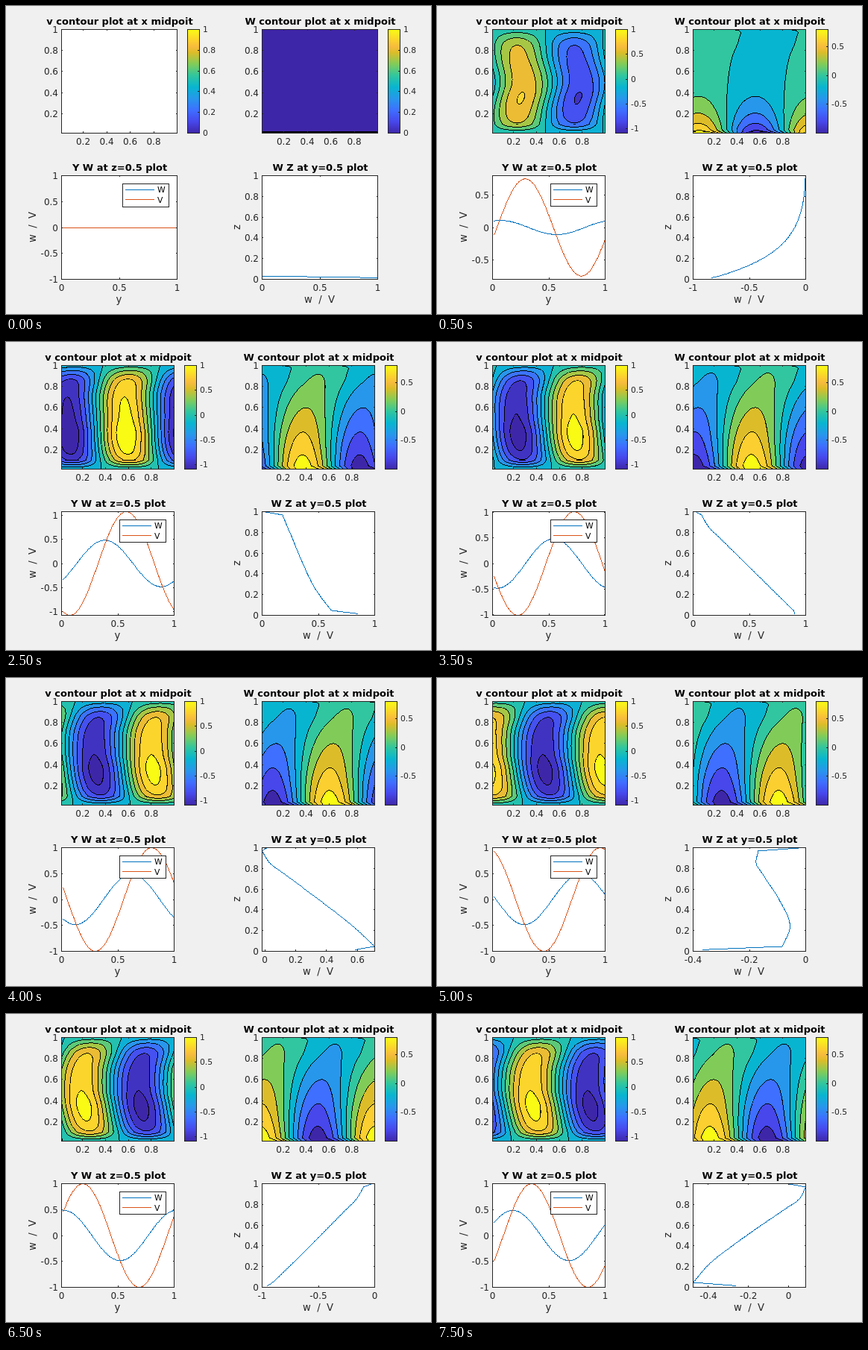
An HTML page with a canvas for the animation above (8 s loop, 570 by 413 pixels).

```html
<!DOCTYPE html>
<html lang="en">
<head>
<meta charset="utf-8">
<title>Wave plots</title>
<style>
html, body { margin: 0; width: 570px; height: 413px; overflow: hidden; background: #f0f0f0; }
canvas { display: block; }
</style>
</head>
<body>
<canvas id="stage" width="570" height="413"></canvas>
<script>
const ctx = document.getElementById('stage').getContext('2d');
const FONT = '"DejaVu Sans", Verdana, sans-serif';
const INK = '#262626', BLUE = '#0072bd', RED = '#d95319';
const N = 64, STEPS = 16, HOLD = 500;
const TOP = 31, LOW = 227, H = 139, LEFT = 74, RIGHT = 343;

// Colour stops: position (0 to 9), r, g, b
const STOPS = [
  [0, 62, 38, 168], [1, 71, 71, 235], [2, 62, 111, 255], [3, 39, 151, 235],
  [4, 8, 181, 208], [5, 49, 198, 159], [6, 129, 204, 89], [7, 220, 189, 41],
  [7.5, 247, 187, 61], [8, 252, 207, 48], [9, 249, 251, 21]
];
// Vertical profile of W: z, cosine part, sine part
const W_PROFILE = [
  [1 / 64, .996, -.087], [3 / 64, .888, .18], [.25, .695, .15], [.5, .483, .045],
  [.75, .278, -.08], [.85, .195, -.128], [62 / 64, .13, -.139], [1, .02, 0]
];
// Vertical profile of V: z, amplitude, shift along y
const V_PROFILE = [
  [1 / 64, .01, .09], [.1, .77, .08], [.18, .97, .06], [.35, 1.085, .025], [.5, 1, 0],
  [.7, .93, .012], [.85, .8, .058], [.93, .5, .085], [1, .1, .11]
];
const V_GAIN = [0, .75, .97, 1.05, 1.075, 1.075, 1.04, 1.015];

const vGain = k => k < V_GAIN.length ? V_GAIN[k] : .998;
const clamp = (v, a, b) => Math.min(b, Math.max(a, v));

function color(t) {
  const p = clamp(t, 0, 1) * 9;
  let i = 0;
  while (i < STOPS.length - 2 && p > STOPS[i + 1][0]) i++;
  const a = STOPS[i], b = STOPS[i + 1], u = (p - a[0]) / (b[0] - a[0]);
  return [1, 2, 3].map(c => Math.round(a[c] + (b[c] - a[c]) * u));
}

// Linear in the end cells, smooth cubic between
function profile(nodes, z) {
  const last = nodes.length - 2;
  let i = 0;
  while (i < last && z > nodes[i + 1][0]) i++;
  const a = nodes[i], b = nodes[i + 1], h = b[0] - a[0], u = (z - a[0]) / h;
  if (i === 0 || i === last) return [1, 2].map(c => a[c] + (b[c] - a[c]) * u);
  const p = i > 1 ? nodes[i - 1] : a, q = i < last - 1 ? nodes[i + 2] : b;
  return [1, 2].map(c => {
    const m0 = (b[c] - p[c]) / (b[0] - p[0]) * h, m1 = (q[c] - a[c]) / (q[0] - a[0]) * h;
    const u2 = u * u, u3 = u2 * u;
    return (2 * u3 - 3 * u2 + 1) * a[c] + (u3 - 2 * u2 + u) * m0 +
      (3 * u2 - 2 * u3) * b[c] + (u3 - u2) * m1;
  });
}

// Each returns a function of y at height z and step k
function wRow(z, k) {
  if (!k) return () => z < 1.5 / N ? 1 : 0;
  let [re, im] = profile(W_PROFILE, z);
  if (z > 1.5 / N) {
    const fade = Math.exp(-3 * z / k ** 4);
    re *= fade;
    im *= fade * (1 - .2 * Math.exp((3 - k) / 3) * (1 - .3 * z));
  }
  return y => {
    const a = 2 * Math.PI * y - k / 2;
    return re * Math.cos(a) - im * Math.sin(a);
  };
}

function vRow(z, k) {
  const [amp, shift] = profile(V_PROFILE, z);
  const bend = shift * (1 - Math.exp((1 - k) / 3));
  const early = .041 * Math.exp((3 - k) / 5) * Math.exp(-(((z - .5) / .2) ** 2));
  const peak = .149 + bend + early + k / (4 * Math.PI);
  return y => vGain(k) * amp * Math.cos(2 * Math.PI * (y - peak));
}

function label(s, x, y, size = 12, align = 'center', fill = INK, bold = '') {
  ctx.font = `${bold} ${size}px ${FONT}`;
  ctx.textAlign = align;
  ctx.fillStyle = fill;
  ctx.fillText(s, x, y);
}

const title = (s, x, y) => label(s, x + 1, y, 13, 'center', '#000', 'bold');

function sideLabel(s, x, y) {
  ctx.save();
  ctx.translate(x, y);
  ctx.rotate(-Math.PI / 2);
  label(s, 0, 0, 13.2);
  ctx.restore();
}

function box(x, y, w, h) {
  ctx.strokeStyle = INK;
  ctx.lineWidth = 1;
  ctx.strokeRect(x + .5, y + .5, w, h);
}

function dot(x, y, w, h, fill) {
  ctx.fillStyle = fill;
  ctx.fillRect(x, y, w, h);
}

// Hard-edged one-pixel polyline
function line(points, fill) {
  ctx.fillStyle = fill;
  for (let i = 1; i < points.length; i++) {
    const [x0, y0] = points[i - 1], [x1, y1] = points[i];
    const n = Math.max(1, Math.ceil(Math.max(Math.abs(x1 - x0), Math.abs(y1 - y0))));
    for (let j = 0; j <= n; j++) {
      ctx.fillRect(Math.round(x0 + (x1 - x0) * j / n), Math.round(y0 + (y1 - y0) * j / n), 1, 1);
    }
  }
}

function range(lo, hi, step) {
  const out = [];
  for (let i = Math.ceil(lo / step - 1e-6); i * step <= hi + 1e-6; i++) out.push(+(i * step).toFixed(1) || 0);
  return out;
}

function xTicks(values, at, top, bottom) {
  for (const v of values) {
    const x = at(v);
    label(String(v), x + .5, bottom + 16);
    dot(Math.round(x), bottom - 2, 1, 2, INK);
    dot(Math.round(x), top, 1, 2, INK);
  }
}

function yTicks(values, at, left, width) {
  for (const v of values) {
    const y = at(v);
    label(String(v), left - 4, y + 5, 12, 'right');
    dot(left, Math.round(y), 2, 1, INK);
    dot(left + width - 1, Math.round(y), 2, 1, INK);
  }
}

function contour(row, k, left, w, lo, hi) {
  const img = ctx.createImageData(w + 1, H + 1), span = 1 - 1 / N;
  const rows = [];
  for (let j = 0; j <= H + 1; j++) {
    const f = row(Math.max(1 / N, 1 - span * j / H), k), r = [];
    for (let i = 0; i <= w + 1; i++) r.push(f(1 / N + span * i / w) * 5);
    rows.push(r);
  }
  const top = Math.round(hi * 5);
  for (let j = 0; j <= H; j++) for (let i = 0; i <= w; i++) {
    const f = rows[j][i], near = Math.round(f);
    const slope = Math.max(Math.abs(rows[j][i + 1] - f), Math.abs(rows[j + 1][i] - f));
    const edge = Math.abs(near) <= top && Math.abs(f - near) < slope / 2;
    const band = Math.floor(f) < -top ? lo : Math.min(hi, Math.floor(f) / 5);
    const c = edge ? [0, 0, 0] : color((band - lo) / (hi - lo));
    img.data.set([...c, 255], (j * (w + 1) + i) * 4);
  }
  ctx.putImageData(img, left, TOP);
}

function colorbar(x, lo, hi, step) {
  for (let j = 0; j <= H; j++) dot(x, TOP + j, 17, 1, `rgb(${color(1 - j / H)})`);
  box(x, TOP, 16, H);
  for (const v of range(lo, hi, step)) {
    const y = TOP + (hi - v) / (hi - lo) * H;
    label(String(v), x + 21, y + 4, 10.8, 'left');
    dot(x + 14, Math.round(y), 2, 1, INK);
  }
}

function contourPanel(k, left, w, name, row, lo, hi) {
  const span = 1 - 1 / N;
  dot(left, TOP, w, H, '#fff');
  if (k) contour(row, k, left, w, lo, hi);
  else if (row === wRow) {
    dot(left, TOP, w, H, `rgb(${color(0)})`);
    dot(left, TOP + H - 2, w, 3, '#000');
  }
  box(left, TOP, w, H);
  xTicks([.2, .4, .6, .8], v => left + (v - 1 / N) / span * w, TOP, TOP + H);
  yTicks([.2, .4, .6, .8, 1], v => TOP + (1 - v) / span * H, left, w);
  title(name, left + w / 2, 25);
  if (k) colorbar(left + w + 14, lo, hi, .5);
  else colorbar(left + w + 14, 0, 1, .2);
}

function sectionPanel(k, w) {
  const gain = vGain(k);
  const lim = !k ? 1 : gain > 1 ? gain : Math.ceil(gain * 5) / 5;
  const xAt = v => LEFT + v * w, yAt = v => LOW + (1 - v / lim) * H / 2;
  const curve = f => Array.from({ length: N }, (_, i) => [xAt((i + 1) / N), yAt(f((i + 1) / N))]);
  dot(LEFT, LOW, w, H, '#fff');
  line(curve(wRow(.5, k)), BLUE);
  line(curve(vRow(.5, k)), RED);
  box(LEFT, LOW, w, H);
  xTicks([0, .5, 1], xAt, LOW, LOW + H);
  yTicks(range(-lim, lim, .5), yAt, LEFT, w);
  title('Y W at z=0.5 plot', LEFT + w / 2, 221);
  label('y', LEFT + w / 2, 398, 13.2);
  sideLabel('w  /  V', 40, LOW + H / 2);

  const x = LEFT + w - 73;
  dot(x, 238, 62, 30, '#fff');
  box(x, 238, 62, k ? 30 : 31);
  dot(x + 4, 246, 39, 1, BLUE);
  dot(x + 4, 259, 39, 1, RED);
  label('W', x + 47, 250, 10.8, 'left', '#000');
  label('V', x + 47, 264, 10.8, 'left', '#000');
}

function depthPanel(k, w) {
  const data = Array.from({ length: N }, (_, i) => [wRow((i + 1) / N, k)(.5), (i + 1) / N]);
  const values = data.map(d => d[0]);
  let lo = Math.min(...values), hi = Math.max(...values);
  if (lo > -.005) [lo, hi] = [0, Math.ceil(hi * 5 - 1e-6) / 5];
  else if (hi < .005) [lo, hi] = [Math.floor(lo * 5 + 1e-6) / 5, 0];
  const span = hi - lo, step = span > .85 ? .5 : span > .35 ? .2 : .1;
  const xAt = v => RIGHT + (v - lo) / span * w, yAt = z => LOW + (1 - z) * H;
  dot(RIGHT, LOW, w, H, '#fff');
  line(data.map(([v, z]) => [clamp(xAt(v), RIGHT, RIGHT + w), yAt(z)]), BLUE);
  box(RIGHT, LOW, w, H);
  xTicks(range(lo, hi, step), xAt, LOW, LOW + H);
  yTicks([0, .2, .4, .6, .8, 1], yAt, RIGHT, w);
  title('W Z at y=0.5 plot', RIGHT + w / 2, 221);
  label('w  /  V', RIGHT + w / 2, 398, 13.2);
  sideLabel('z', 314, LOW + H / 2);
}

function draw(k) {
  const w = k ? 151 : 155;
  dot(0, 0, 570, 413, '#f0f0f0');
  contourPanel(k, LEFT, w, 'v contour plot at x midpoit', vRow, -1.09, 1);
  contourPanel(k, RIGHT, w, 'W contour plot at x midpoit', wRow, -.999, .8);
  sectionPanel(k, w);
  depthPanel(k, w);
}

let shown = -1;
const start = performance.now();
function tick() {
  const k = Math.floor((performance.now() - start) / HOLD) % STEPS;
  if (k !== shown) draw(shown = k);
  requestAnimationFrame(tick);
}
tick();
</script>
</body>
</html>
```
